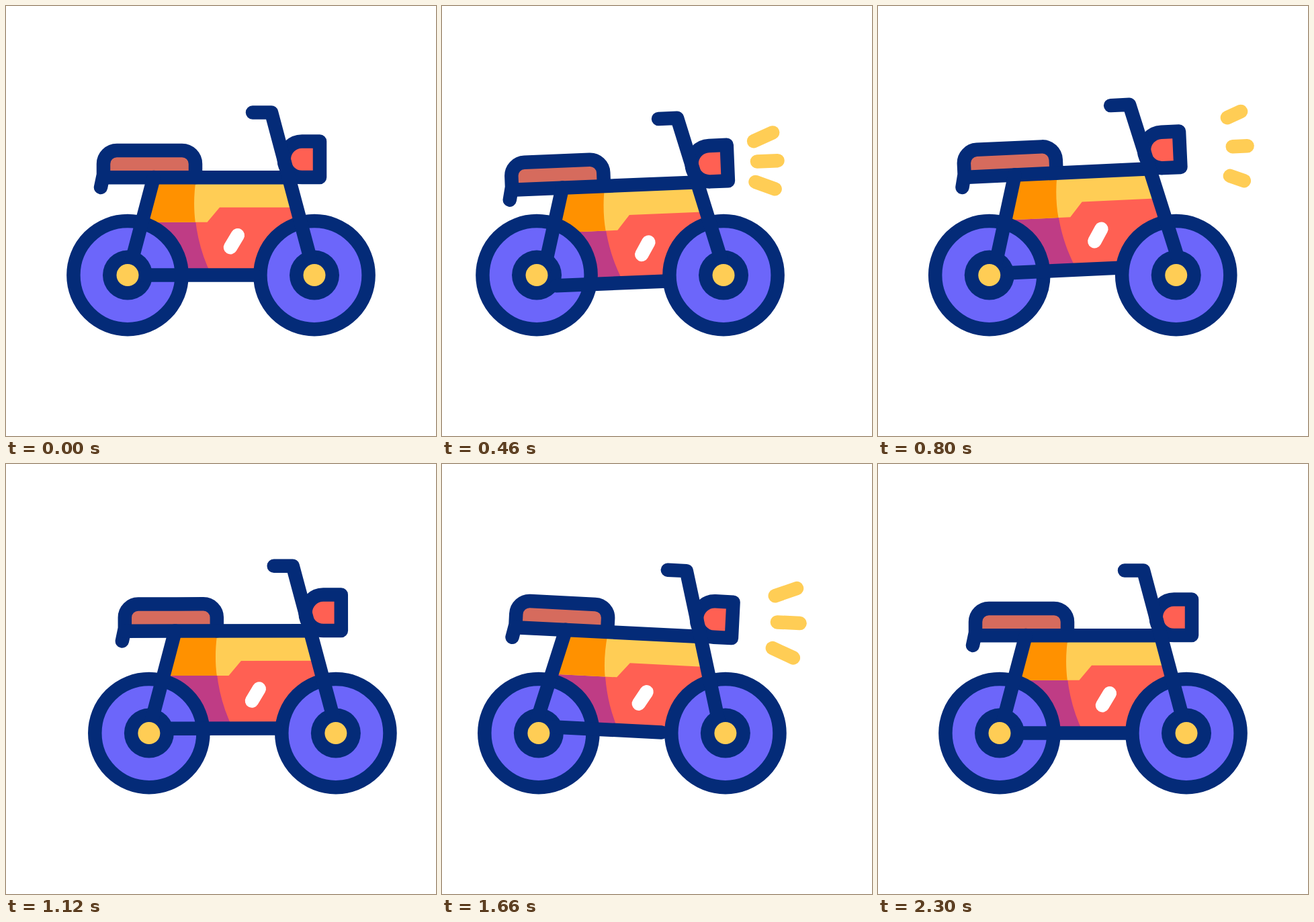
These frames come from a looping animation (640x640 px, 2.4 s). An HTML page:

```html
<!DOCTYPE html>
<html lang="en">
<head>
<meta charset="utf-8">
<title>Motorbike</title>
<style>
  html, body { margin: 0; width: 100%; height: 100%; overflow: hidden; background: #fff; }
  svg { display: block; width: 100%; height: 100%; }
  .line { fill: none; stroke: #042b78; stroke-width: 20.5; stroke-linecap: round; stroke-linejoin: round; }
  .ray { stroke: #ffcd55; stroke-width: 20.5; stroke-linecap: round; }
</style>
</head>
<body>
<svg viewBox="0 0 640 640">
  <defs>
    <clipPath id="tank"><path d="M220 255H420.5L459 400H182Z"/></clipPath>
    <g id="wheel">
      <circle r="80.6" fill="#6c66fa" stroke="#042b78" stroke-width="20.5"/>
      <circle r="37" fill="#042b78"/>
    </g>
  </defs>

  <g class="body">
    <g clip-path="url(#tank)">
      <path fill="#ff6053" d="M170 250H470V410H170Z"/>
      <path fill="#bf3c85" d="M170 250H284C276 296 281 350 305.500 400V410H170Z"/>
      <path fill="#ffcd55" d="M170 250H470V299.700H318L299.500 321.700H170Z"/>
      <path fill="#ff9100" d="M170 250H284C279.500 276 279 300 281.800 321.700H170Z"/>
    </g>
    <path d="M344.800 341.300L334 359.300" stroke="#fff" stroke-width="20.500" stroke-linecap="round"/>
  </g>

  <g class="wheels">
    <use href="#wheel" x="181" y="400.600"/>
    <use href="#wheel" x="459" y="400.600"/>
  </g>

  <g class="body">
    <path fill="#d66b5d" d="M145 255V235A20 20 0 0 1 165 215H262A20 20 0 0 1 282 235V255Z"/>
    <path fill="#ff6053" d="M467 201.500H440.500A26.700 26.700 0 0 0 440.500 255H467Z"/>
    <g class="line">
      <path d="M282 255V235A20 20 0 0 0 262 215H165A20 20 0 0 0 145 235V251L141 270"/>
      <path d="M145 255.200H421"/>
      <path d="M467 201.500H440.500A26.700 26.700 0 0 0 440.500 255H467Z"/>
      <path d="M367 158.500H395L457 391"/>
      <path d="M220 255L184 391"/>
      <path d="M205 400.400H370"/>
    </g>
    <g id="rays"></g>
  </g>

  <g class="wheels" fill="#ffcd55">
    <circle cx="181" cy="400.600" r="16.500"/>
    <circle cx="459" cy="400.600" r="16.500"/>
  </g>
</svg>

<script>
const LOOP = 2400;

// [time, value] keys, eased in and out between neighbours
const shift = [[0, 0], [582, -45], [1100, 32.2], [1630, -37.5], [2160, 0]];
const lift = [[0, 0], [480, 12], [930, -12.5], [1400, 3.5], [1870, -9.5], [2200, 0]];
const tilt = [[0, 0], [660, -3], [1600, 3], [2085, 0]];

// Each flash draws the rays outward, then wipes them from the lamp side
const flashes = [
  { head: [[210, 0], [685, 1]], tail: [[525, 0], [1005, 1]] },
  { head: [[1137, 0], [1612, 1]], tail: [[1455, 0], [1930, 1]] }
];
const rays = [
  [507.5, 197.5, 560.3, 176.2],
  [511.2, 227.9, 567.5, 227.9],
  [507.5, 258.3, 560.3, 279.6]
];

const mix = (a, b, k) => a + (b - a) * k;
const ease = k => k * k * (3 - 2 * k);

function at(keys, t) {
  if (t <= keys[0][0]) return keys[0][1];
  for (let i = 1; i < keys.length; i++) {
    const [t0, a] = keys[i - 1], [t1, b] = keys[i];
    if (t < t1) return mix(a, b, ease((t - t0) / (t1 - t0)));
  }
  return keys[keys.length - 1][1];
}

const bodies = document.querySelectorAll('.body');
const wheels = document.querySelectorAll('.wheels');
const rayLines = rays.map(() => {
  const line = document.createElementNS('http://www.w3.org/2000/svg', 'line');
  line.setAttribute('class', 'ray');
  return document.getElementById('rays').appendChild(line);
});

function drawRays(t) {
  const flash = flashes[t < 1070 ? 0 : 1];
  const from = at(flash.tail, t), to = at(flash.head, t);
  rayLines.forEach((line, i) => {
    const [x0, y0, x1, y1] = rays[i];
    line.style.display = to - from > 0.002 ? '' : 'none';
    line.setAttribute('x1', mix(x0, x1, from));
    line.setAttribute('y1', mix(y0, y1, from));
    line.setAttribute('x2', mix(x0, x1, to));
    line.setAttribute('y2', mix(y0, y1, to));
  });
}

function draw(t) {
  const x = at(shift, t);
  const pose = `translate(${x} ${at(lift, t)}) rotate(${at(tilt, t)} 304 279)`;
  bodies.forEach(g => g.setAttribute('transform', pose));
  wheels.forEach(g => g.setAttribute('transform', `translate(${x} 0)`));
  drawRays(t);
}

const start = performance.now();
function tick() {
  draw((performance.now() - start) % LOOP);
  requestAnimationFrame(tick);
}
draw(0);
requestAnimationFrame(tick);
</script>
</body>
</html>
```
